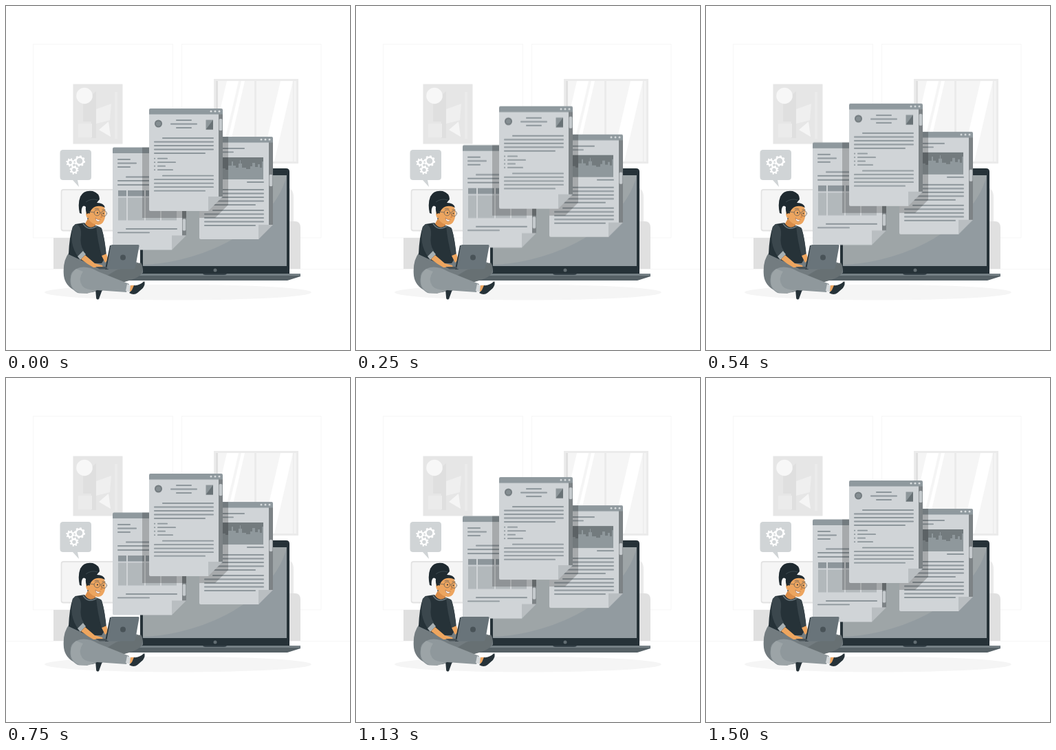
Animation of 500 by 500 pixels, one loop 1540 ms. Source, as an HTML page:

```html
<!DOCTYPE html>
<html lang="en">
<head>
<meta charset="utf-8">
<title>Floating documents</title>
<style>
  html, body { margin: 0; width: 100%; height: 100%; overflow: hidden; background: #fff; }
  svg { display: block; width: 100vw; height: 100vh; }
  .text { fill: none; stroke: #8d969b; stroke-width: 1.8; stroke-linecap: round; }
</style>
</head>
<body>
<svg viewBox="0 0 500 500">
  <defs>
    <clipPath id="backPages">
      <path d="M155 205.5H262V333.500L241 354.500H155ZM281 190H388V318L367 339H281Z"/>
    </clipPath>
    <clipPath id="panes"><path d="M308 109H361V226H308ZM364 109H417V226H364Z"/></clipPath>
    <clipPath id="display"><path d="M199 246H408V378H199Z"/></clipPath>
  </defs>

  <g id="room">
    <path d="M39.500 55.500H242.500V337H39.500ZM255.500 55.500H458V337H255.500ZM0 382.500H500" fill="none" stroke="#f3f3f3" stroke-width=".7"/>

    <path d="M97.500 113.500H169.500V200.500H97.500Z" fill="#e6e6e6"/>
    <path d="M158 125H162V193H158Z" fill="#ebebeb"/>
    <path d="M112 140L131 124V192H124V168H112Z" fill="#dfdfdf"/>
    <path d="M131 150L153 142L151 166L131 171Z" fill="#efefef"/>
    <path d="M105 171H125V191H105Z" fill="#ebebeb"/>
    <path d="M135 180L149 168L152 190Z" fill="#f5f5f5"/>
    <circle cx="114" cy="130.500" r="11.800" fill="#f7f7f7"/>

    <path d="M302 106H425V229H302Z" fill="#ebebeb"/>
    <path d="M308 109H361V226H308ZM364 109H417V226H364Z" fill="#f5f5f5"/>
    <path d="M305 109H308V226H305Z" fill="#e0e0e0"/>
    <path d="M418 109H422V226H418Z" fill="#f3f3f3"/>
    <g clip-path="url(#panes)" fill="#fff">
      <path d="M321 109H338L311 226H294ZM342 109H347L320 226H315ZM399 109H417L390 226H372Z"/>
    </g>

    <path d="M69 337H113V382H69Z" fill="#e0e0e0"/>
    <rect x="80.500" y="267" width="86" height="59.500" rx="3" fill="#f5f5f5" stroke="#e3e3e3" stroke-width="1.800"/>
    <path d="M408 264Q418 265 418 278V320H408Z" fill="#ebebeb"/>
    <path d="M408 313H420Q428 313 428 322V382H408Z" fill="#e0e0e0"/>
    <ellipse cx="250" cy="416.200" rx="193.900" ry="11.300" fill="#f5f5f5"/>
  </g>

  <g id="bubble">
    <path d="M83 209H119.500Q124 209 124 213.500V248.500Q124 253 119.500 253H104L106 263L97 253H83Q78.500 253 78.500 248.500V213.500Q78.500 209 83 209Z" fill="#d0d4d6"/>
    <g id="gears" fill="none" stroke="#fff"></g>
  </g>

  <g id="computer">
    <path d="M195 389V241Q195 236 200 236H407Q412 236 412 241V389Z" fill="#263238"/>
    <path d="M199 246H408V378H199Z" fill="#929ba0"/>
    <path d="M199 246H408Q400 280 368 310Q326 351 252 369Q226 375 199 376Z" fill="#9ea5a7" clip-path="url(#display)"/>
    <circle cx="304" cy="384" r="2.500" fill="#626d72"/>
    <path d="M150 389H428V393L409 399H150Z" fill="#566166"/>
    <path d="M150 389H428V392H150Z" fill="#758085"/>
    <path d="M286 389H321Q320 391 317 391H290Q287 391 286 389Z" fill="#37434a"/>
  </g>

  <g id="pages"></g>

  <g id="woman">
    <path d="M92 358Q82 370 84 392Q86 407 101 414Q111 418 126 416L180 398L199 388Q200 373 187 372L141 368Z" fill="#737c80"/>
    <path d="M196 373Q201 380 196 390Q190 398 158 404L134 412L127 404L160 384Z" fill="#677073"/>
    <path d="M131 406L144 406Q143 411 139 415L135 426Q131 428 131 423L130 411Z" fill="#263238"/>
    <path d="M94 394Q94 384 108 380Q120 378 134 386L179 404L175 416L132 413Q116 419 104 417Q91 410 94 394Z" fill="#8f989c"/>
    <path d="M112 386Q104 397 111 407Q116 413 132 413L118 418Q99 418 95 405Q92 390 102 382Z" fill="#9ca4a7"/>
    <path d="M176 404L184 408L181 416L174 414Z" fill="#d5d9db"/>
    <path d="M181 406L187 406L187 414L180 415Z" fill="#eda55f"/>
    <path d="M186 406Q193 407 201 400Q203 404 199 410L191 417Q186 421 179 417L183 413Z" fill="#263238"/>

    <path d="M119 309L130 311V324Q122 328 113 320Z" fill="#d98c49"/>
    <path d="M101 317L114 315Q121 326 130 319L139 323Q144 340 146 363L139 374H119L91 361Q92 335 97 321Z" fill="#263238"/>
    <path d="M131 319L138 322Q143 332 145 360L139 363Q133 342 131 319Z" fill="#39454b"/>
    <path d="M101 317Q110 319 109 333Q107 347 113 356L105 365Q91 345 97 321Z" fill="#3b474d"/>
    <path d="M112 316Q119 328 132 320" fill="none" stroke="#6c777c" stroke-width="1.500"/>
    <path d="M104 364L112 356L116 361L108 369Z" fill="#a8b0b3"/>
    <path d="M109 368L115 362L129 374L140 377L141 380L127 380Q118 375 109 368Z" fill="#eda55f"/>
    <path d="M139 363L146 360L149 369L144 373Z" fill="#eda55f"/>

    <path d="M120 291Q127 286 140 289Q146 295 144 307Q142 317 135 318Q126 319 119 309Q113 303 120 291Z" fill="#eda55f"/>
    <path d="M107 301Q104 287 108 277Q113 267 126 269Q136 272 136 281L132 286Q142 286 144 293Q133 288 126 294Q121 298 121 307Q115 302 116 292Q113 289 111 292Q109 296 110 302Z" fill="#1f2a30"/>
    <path d="M116 285Q124 279 133 282" fill="none" stroke="#46535a" stroke-width=".7"/>
    <circle cx="120" cy="304" r="2.700" fill="#eda55f"/>
    <circle cx="119" cy="309" r="1" fill="#566166"/>
    <g fill="none" stroke="#6c6257" stroke-width=".8" stroke-linecap="round">
      <circle cx="132.500" cy="300.500" r="4.300"/>
      <circle cx="142.500" cy="301.500" r="4"/>
      <path d="M121 299L128 300M129 295Q132 293 135 295M140 296L144 296"/>
    </g>
    <circle cx="133" cy="300.500" r="1" fill="#263238"/>
    <circle cx="141.500" cy="301.500" r=".9" fill="#263238"/>
    <path d="M138 302L139.500 307L137 307" fill="none" stroke="#c27334" stroke-width=".8"/>
    <path d="M130 308Q133 312 137 310Q136 314 133 313Q130 312 130 308Z" fill="#fff" stroke="#8b4b2b" stroke-width=".5"/>

    <path d="M151 348H156L149 383H144Z" fill="#263238"/>
    <path d="M154 347H192Q194 347 193.500 349L188 380Q187.500 382.500 185 382.500H148Q146 382.500 146.500 380L152 349Q152.400 347 154 347Z" fill="#69747a"/>
    <circle cx="170" cy="365.500" r="4" fill="#495358"/>
    <path d="M130 379H147V382.500H136Z" fill="#495358"/>
  </g>
</svg>
<script>
  const pages = document.getElementById('pages');

  // rows: [x1, x2, y] in stage units
  const text = rows =>
    `<path class="text" d="${rows.map(([a, b, y]) => `M${a + .9} ${y}H${b - .9}`).join('')}"/>`;

  const box = (x, y, w, h, fill) =>
    `<rect x="${x}" y="${y}" width="${w}" height="${h}" fill="${fill}"/>`;

  // Full-width rows framed by an indented first row and a short last one
  const paragraph = (x, y, full) => [
    [x + 12, x + 87, y],
    ...Array.from({ length: full }, (_, i) => [x, x + 87, y + 5.5 * (i + 1)]),
    [x, x + 75, y + 5.5 * (full + 1)]
  ];

  const page = (x, y, thumb, content) => `
    <g transform="translate(${x} ${y})">
      <path d="M101 6H107V128H101Z" fill="#7d8386"/>
      <path d="M0 7H101V128L86 149H2Q0 149 0 147Z" fill="#d0d4d7"/>
      <path d="M86 128H107L86 149Z" fill="#b9bec1"/>
      <path d="M0 8.500V2Q0 0 2 0H105Q107 0 107 2V8.500Z" fill="#8f999e"/>
      ${[90, 96, 102].map(cx => `<circle cx="${cx}" cy="4.200" r="1.400" fill="#d9dddf"/>`).join('')}
      <rect x="101.700" y="${thumb}" width="4.600" height="17" rx="1.500" fill="#c5cacd"/>
    </g>${content}`;

  const table = [[163, 12], [177, 24], [203, 21], [226, 22]].map(([x, w]) =>
    box(x, 268, w, 8.5, '#8d969b') + box(x, 278.5, w, 33, '#b2b8bb')).join('');

  const left = page(155, 205.5, 104, table + text([
    [162, 181, 223], [162, 190, 228.5], [162, 181, 234],
    [174, 249, 248.5], [162, 249, 254], [162, 249, 260],
    [174, 249, 324], [162, 209, 329.3]
  ]));

  const city = 'M288 252V238H297V232H304V240H314V236H319V238H323V232H328V226H330V232H334V235H338' +
    'V229H340V224H341V229H343V235H349V237H355V233H358V228H362V234H366V230H369V235H372V226H374V252Z';

  const right = page(281, 190, 55,
    box(288, 220, 86, 32, '#737b7e') + `<path d="${city}" fill="#8f989c"/>` + text([
      [300, 347, 207], [300, 331, 212.3], [350, 375, 256],
      ...[267, 272.5, 278, 283.5].map(y => [288, 375, y]), [288, 363, 289],
      ...paragraph(288, 297, 3)
    ]));

  const bullets = [15, 27, 12, 23].map((w, i) => [220, 220 + w, 221.7 + 5.5 * i]);

  const front = page(208, 149, 15, `
    <circle cx="221.500" cy="171" r="5.500" fill="#737b7f"/>
    <circle cx="221.500" cy="171" r="3.600" fill="#858e92"/>
    ${box(290.5, 165.5, 10.5, 14, '#8d969a')}
    <path d="M301 165.500V179.500H290.500Z" fill="#687175"/>` +
    text([
      [247, 270, 166], [239, 278, 171.5], [247, 270, 177],
      ...paragraph(215, 192, 3),
      ...bullets, ...bullets.map(([, , y]) => [215, 217.2, y]),
      ...paragraph(215, 246.7, 3)
    ]));

  const shadow = `<path d="M198 170H323V289L304 308H198Z" fill="#000" opacity=".2" clip-path="url(#backPages)"/>`;

  pages.innerHTML = left + right + shadow + front;

  const gear = (x, y, r) => {
    const step = 2 * Math.PI * (r + 1.4) / 8;
    return `<circle cx="${x}" cy="${y}" r="${r}" stroke-width="2.400"/>
      <circle cx="${x}" cy="${y}" r="${r + 1.4}" stroke-width="2.400" stroke-dasharray="${step * .48} ${step * .52}"/>`;
  };
  document.getElementById('gears').innerHTML =
    gear(93.5, 227.5, 3.6) + gear(107, 225.3, 5.5) + gear(99, 238.2, 3.9);

  // Linear rise and fall over 1500 ms, then a short rest
  const LOOP = 1540;
  const lift = [[0, 0], [750, -10], [1500, 0], [LOOP, 0]];
  pages.animate(
    lift.map(([t, y]) => ({ offset: t / LOOP, transform: `translateY(${y}px)` })),
    { duration: LOOP, iterations: Infinity, easing: 'linear' }
  );
</script>
</body>
</html>
```
